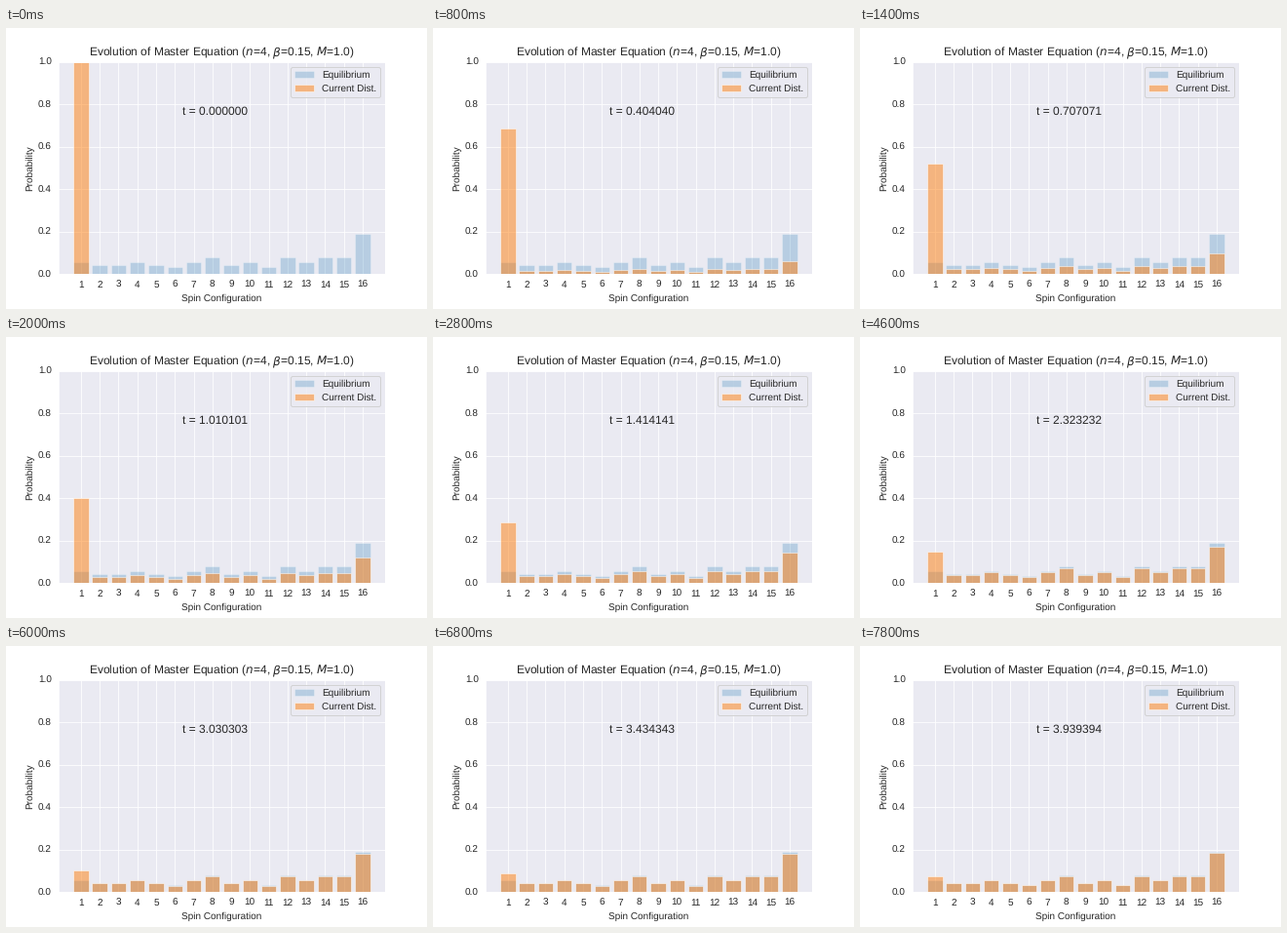
Animation of 432 by 288 pixels, one loop 8000 ms. Source, as a matplotlib script:

```python
from itertools import product

import matplotlib.pyplot as plt
import numpy as np
from matplotlib.animation import FuncAnimation

N, BETA, M = 4, 0.15, 1.0
FRAMES, INTERVAL = 40, 200
DT = 10 / 99

INK = ".15"
plt.rcParams.update({
    "figure.figsize": (6, 4), "figure.dpi": 72, "figure.facecolor": "white",
    "figure.subplot.left": 0.125, "figure.subplot.right": 0.9,
    "figure.subplot.bottom": 0.125, "figure.subplot.top": 0.88,
    "font.family": "Liberation Sans", "font.size": 10,
    "text.hinting": "none",
    "text.color": INK, "axes.labelcolor": INK,
    "xtick.color": INK, "ytick.color": INK,
    "xtick.bottom": False, "ytick.left": False,
    "axes.facecolor": "#EAEAF2", "axes.edgecolor": "white",
    "axes.axisbelow": True, "axes.grid": True,
    "grid.color": "white", "grid.linestyle": "-",
    "patch.edgecolor": "white", "patch.force_edgecolor": True,
})


def boltzmann():
    """Equilibrium of a ring of N spins in a field M."""
    spins = np.array(list(product((-1, 1), repeat=N)))
    coupling = (spins * np.roll(spins, 1, axis=1)).sum(axis=1)
    weights = np.exp(BETA * (coupling + M * spins.sum(axis=1)))
    return weights / weights.sum()


equilibrium = boltzmann()
start = np.eye(2 ** N)[0]
states = np.arange(1, 2 ** N + 1)


def distribution(t):
    return equilibrium + (start - equilibrium) * np.exp(-t)


fig, ax = plt.subplots()
ax.bar(states, equilibrium, color="#1f77b4", alpha=0.25, label="Equilibrium")
bars = ax.bar(states, start, color="#ff7f0e", alpha=0.5, label="Current Dist.")
clock = ax.text(0.4 * 2 ** N, 0.75, "", fontsize=12)

ax.set_ylim(0, 1)
ax.set_xticks(states)
ax.set_xlabel("Spin Configuration")
ax.set_ylabel("Probability")
ax.set_title(rf"Evolution of Master Equation ($n$={N}, $\beta$={BETA}, $M$={M})")
ax.legend(loc="upper right")


def update(i):
    t = i * DT
    for bar, p in zip(bars, distribution(t)):
        bar.set_height(p)
    clock.set_text(f"t = {t:.6f}")
    return [*bars, clock]


anim = FuncAnimation(fig, update, frames=FRAMES, interval=INTERVAL,
                     repeat=True, repeat_delay=0)
plt.show()
```
